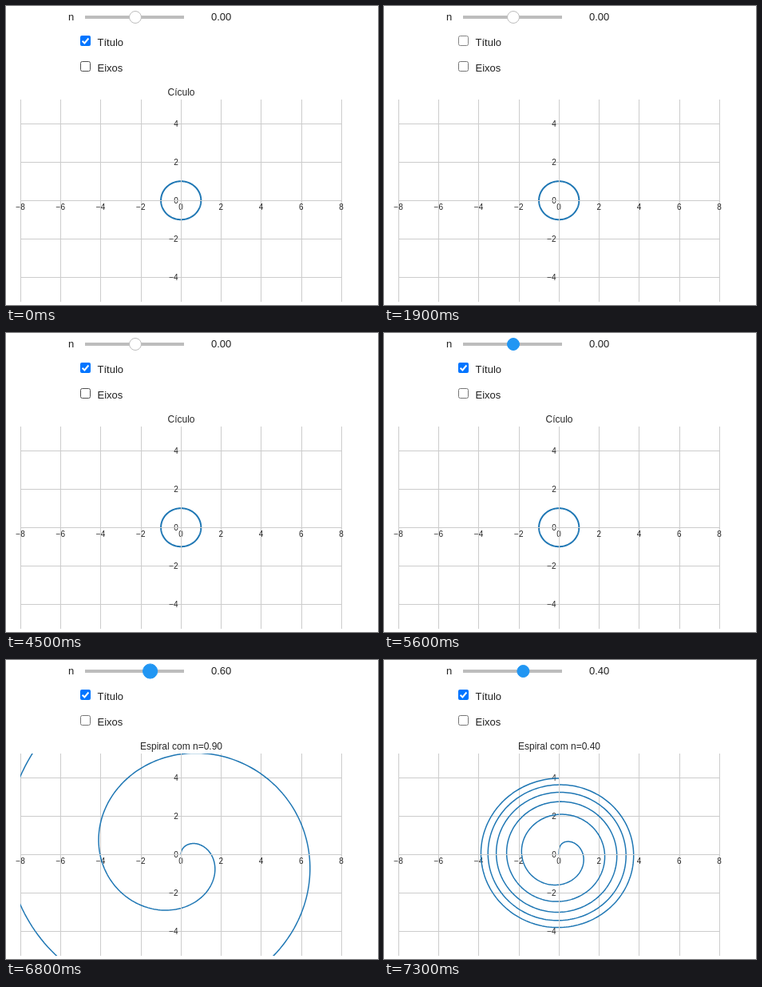
Animation of 466 by 374 pixels, one loop 9000 ms. Source, as an HTML page:

```html
<!DOCTYPE html>
<html lang="pt">
<head>
<meta charset="utf-8">
<style>
  html, body { margin: 0; width: 100%; height: 100%; overflow: hidden; background: #fff; }
  svg { display: block; }
  text { font-family: "Liberation Sans", Arial, sans-serif; fill: #262626; }
  .widget text { font-size: 13px; fill: #212121; }
  .tick { font-size: 10px; }
  .grid, .spine { fill: none; stroke: #ccc; }
  .label { font: italic 10px "DejaVu Sans", sans-serif; }
</style>
</head>
<body>
<svg width="466" height="374" viewBox="0 0 466 374">
  <defs><clipPath id="area"><rect id="clip" x="18" y="117" height="253"/></clipPath></defs>
  <g class="widget">
    <text x="78" y="18">n</text>
    <rect x="99" y="12" width="124" height="4" fill="#bdbdbd"/>
    <circle id="handle" cy="14"/>
    <text id="value" x="257" y="18"></text>
    <g id="titleBox"></g><text x="114.5" y="50">Título</text>
    <g id="axesBox"></g><text x="114.5" y="82">Eixos</text>
  </g>
  <text id="title" y="112" font-size="12" text-anchor="middle"></text>
  <g id="grid"></g>
  <path id="curve" fill="none" stroke="#1f77b4" stroke-linejoin="round" clip-path="url(#area)"/>
  <path id="spines" class="spine"/>
  <g id="labels">
    <text class="label" x="418" y="269" text-anchor="middle">x</text>
    <text class="label" transform="translate(194 119) rotate(-90)" text-anchor="middle">y</text>
  </g>
</svg>
<script>
const DURATION = 9000, CY = 243.2, UNIT_Y = 24;
const $ = id => document.getElementById(id);

// Pointer mode of each control: "" idle, "hover", "press".
const events = [
  [0, { n: 0, plotN: 0, title: 1, axes: 0, titleOn: 1, axesOn: 0, titleMode: "", axesMode: "hover", knob: "" }],
  [300, { titleMode: "hover", axesMode: "" }],
  [1100, { titleMode: "press" }],
  [1200, { titleMode: "hover", titleOn: 0, title: 0 }],
  [1900, { titleMode: "press" }],
  [2000, { titleMode: "hover", titleOn: 1 }],
  [2200, { title: 1 }],
  [2500, { titleMode: "" }],
  [2600, { axesMode: "hover" }],
  [3100, { axesMode: "press" }],
  [3200, { axesMode: "hover", axesOn: 1, axes: 1 }],
  [4100, { axesMode: "press" }],
  [4300, { axesMode: "hover", axesOn: 0 }],
  [4500, { axes: 0 }],
  [5000, { axesMode: "", titleMode: "hover" }],
  [5100, { titleMode: "" }],
  [5600, { knob: "hover" }],
  [5800, { knob: "press" }],
  [6000, { n: .2 }],
  [6100, { n: .4 }],
  [6200, { n: .7, plotN: .4 }],
  [6300, { n: .9 }],
  [6600, { n: .7, plotN: .9 }],
  [6800, { n: .6 }],
  [6900, { n: .5, plotN: .6 }],
  [7000, { n: .4 }],
  [7100, { plotN: .4 }],
  [7300, { knob: "hover" }],
];

function checkbox(y, on, mode) {
  const fill = { "": "#0075ff", hover: "#005cc8", press: "#3793ff" }[mode];
  const border = { "": "#767676", hover: "#4f4f4f", press: "#858585" }[mode];
  return on
    ? `<rect x="93" y="${y}" width="13" height="13" rx="2" fill="${fill}"/>
       <path d="M95.6 ${y + 6.7}l2.8 2.8 5-6" fill="none" stroke="#fff" stroke-width="2"/>`
    : `<rect x="93.5" y="${y + .5}" width="12" height="12" rx="2" fill="#fff" stroke="${border}"/>`;
}

function drawGrid(cx, unitX) {
  const right = Math.floor(cx + 8 * unitX) + 1;
  const line = { x: v => `M${Math.floor(cx + v * unitX) + .5} 117V370`,
                 y: v => `M18 ${Math.floor(CY - v * UNIT_Y) + .5}H${right}` };
  const name = v => String(v).replace("-", "−");
  const text = (x, y, v, anchor) =>
    `<text class="tick" x="${x}" y="${y}" text-anchor="${anchor}">${name(v)}</text>`;
  let lines = "", ticks = "";
  for (let v = -8; v <= 8; v += 2) {
    lines += line.x(v);
    ticks += text(cx + v * unitX - .4, 255, v, "middle");
    if (Math.abs(v) > 4) continue;
    lines += line.y(v);
    ticks += text(cx - 3.7, CY - v * UNIT_Y + 3.8, v, "end");
  }
  $("grid").innerHTML = `<path class="grid" d="${lines}"/>${ticks}`;
  $("spines").setAttribute("d", line.x(0) + line.y(0));
  $("clip").setAttribute("width", right - 18);
}

function spiral(n, cx, unitX) {
  const points = [], steps = 1000;
  for (let i = 0; i <= steps; i++) {
    const a = 10 * Math.PI * i / steps, r = a ** n;
    points.push((cx + r * Math.sin(a) * unitX).toFixed(2) + " " + (CY - r * Math.cos(a) * UNIT_Y).toFixed(2));
  }
  return "M" + points.join("L");
}

function render(s) {
  const cx = s.axes ? 218.4 : 219.4, unitX = s.axes ? 25 : 25.125;
  const handle = $("handle"), pressed = s.knob === "press";
  handle.setAttribute("cx", 162 + 31 * s.n);
  handle.setAttribute("r", pressed ? 9.1 : 7.5);
  handle.setAttribute("fill", s.knob ? "#2196f3" : "#fff");
  handle.setAttribute("stroke", s.knob ? "#2196f3" : "#bdbdbd");
  $("value").textContent = s.n.toFixed(2);
  $("titleBox").innerHTML = checkbox(37, s.titleOn, s.titleMode);
  $("axesBox").innerHTML = checkbox(69, s.axesOn, s.axesMode);
  $("title").setAttribute("x", cx + .1);
  $("title").textContent = !s.title ? "" : s.plotN ? "Espiral com n=" + s.plotN.toFixed(2) : "Cículo";
  drawGrid(cx, unitX);
  $("curve").setAttribute("d", spiral(s.plotN, cx - .2, unitX));
  $("curve").setAttribute("stroke-width", s.plotN ? 1.5 : 2);
  $("labels").style.display = s.axes ? "" : "none";
}

let shown = -1;
function tick() {
  const t = performance.now() % DURATION;
  const past = events.filter(([start]) => start <= t);
  if (past.length !== shown) {
    shown = past.length;
    render(Object.assign({}, ...past.map(([, change]) => change)));
  }
  requestAnimationFrame(tick);
}
tick();
</script>
</body>
</html>
```
